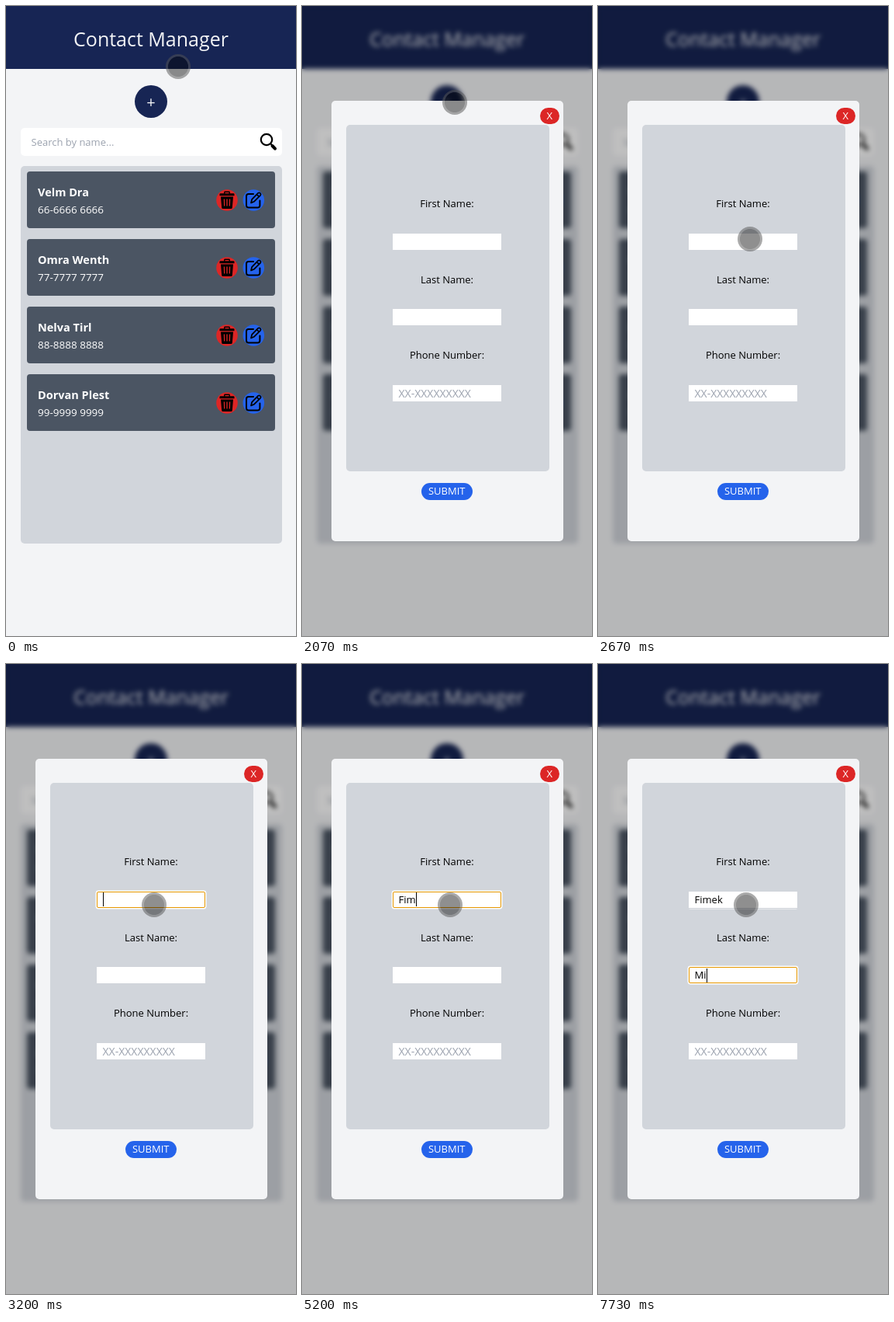
Animation, 374 px wide and 811 px high, one loop 8 s. Source, as an HTML page:

```html
<!DOCTYPE html>
<html lang="en">
<head>
<meta charset="utf-8">
<title>Contact Manager</title>
<style>
  html, body { margin: 0; width: 100%; height: 100%; overflow: hidden; }
  body { position: relative; background: #f3f4f6; font: 13px "Open Sans", "Noto Sans", sans-serif; color: #000; }
  div, svg, i { position: absolute; box-sizing: border-box; }
  .text { white-space: pre; line-height: 20px; height: 20px; }
  .center { left: 0; width: 374px; text-align: center; }
  .hint { color: #9ca3af; }

  #header { left: 0; top: 0; width: 374px; height: 80.5px; background: #172554; }
  #title { top: 32px; font-size: 25px; color: #f3f4f6; }
  #add { left: 166px; top: 102px; width: 42px; height: 42px; border-radius: 50%; background: #172554;
    color: #f3f4f6; font-size: 20px; line-height: 43px; text-align: center; }
  #search { left: 19px; top: 157px; width: 337px; height: 35.5px; border-radius: 5px; background: #fff; }
  #list { left: 19px; top: 206px; width: 337px; height: 486px; border-radius: 5px; background: #d1d5db; }
  .card { left: 8px; width: 320px; height: 73px; border-radius: 4px; background: #4b5563; color: #fff; }
  .card .name { left: 14px; top: 17px; font-size: 14.5px; font-weight: 700; }
  .card .phone { left: 14px; top: 39px; font-size: 13.5px; }
  .card svg { left: 243px; top: 22px; }

  #shade { inset: 0; background: rgba(0, 0, 0, .25); backdrop-filter: blur(3px); }
  #dialog { left: 37.5px; top: 122px; width: 299px; height: 567px; border-radius: 5px; background: #f3f4f6; }
  #panel { left: 56.5px; top: 153px; width: 262px; height: 446px; border-radius: 5px; background: #d1d5db; }
  .pill { color: #fff; text-align: center; border-radius: 11px; }
  #close { left: 307px; top: 130.5px; width: 24.5px; height: 21px; line-height: 21px; background: #dc2626; }
  #submit { left: 153.5px; top: 614px; width: 66.5px; height: 21.5px; line-height: 21.5px; background: #2563eb; }
  .field { left: 117px; width: 140px; height: 21px; background: #fff; padding-left: 7.5px; line-height: 21px; white-space: pre; }
  .field.focus { border-radius: 2px; outline: 1.5px solid #e59700; outline-offset: -1px; box-shadow: 0 0 0 1.4px #fff; }
  .field i { top: 1.5px; width: 1px; height: 18px; background: #000; }
  .field .hint { font-size: 14px; }

  #pointer { left: -16px; top: -16px; width: 32px; height: 32px; border-radius: 50%; background: rgba(85, 85, 85, .5); 
    -webkit-mask: none; }
  #pointer { background: radial-gradient(circle, rgba(0, 0, 0, .44) 12.6px, rgba(85, 85, 85, .5) 13.4px); }
</style>
</head>
<body>
<div id="header"></div>
<div id="title" class="text center">Contact Manager</div>
<div id="add">+</div>
<div id="search">
  <div class="text hint" style="left:13.5px;top:8px">Search by name...</div>
  <svg style="left:308px;top:6px" width="24" height="25" fill="none" stroke="#000" stroke-linecap="round">
    <circle cx="9" cy="9" r="7.2" stroke-width="2.2"/>
    <path d="M14.5 14.5L16 16" stroke-width="2"/>
    <path d="M16.5 17L20 20.6" stroke-width="4"/>
  </svg>
</div>
<div id="list"></div>

<div id="modal">
  <div id="shade" style="width:374px;height:811px"></div>
  <div id="dialog"></div>
  <div id="panel"></div>
  <div id="close" class="pill">X</div>
  <div class="text center" style="top:244px">First Name:</div>
  <div class="field" style="top:292.5px"></div>
  <div class="text center" style="top:342px">Last Name:</div>
  <div class="field" style="top:390px"></div>
  <div class="text center" style="top:439px">Phone Number:</div>
  <div class="field" style="top:487.5px"><span class="hint">XX-XXXXXXXXX</span></div>
  <div id="submit" class="pill">SUBMIT</div>
</div>
<div id="pointer"></div>

<script>
const LOOP = 8000;
const MODAL_AT = 2070;
const $ = id => document.getElementById(id);

const contacts = [
  ["Velm Dra", "66-6666 6666"],
  ["Omra Wenth", "77-7777 7777"],
  ["Nelva Tirl", "88-8888 8888"],
  ["Dorvan Plest", "99-9999 9999"],
];

const icons = `<svg width="66" height="30">
  <circle cx="15" cy="15" r="13.8" fill="#dc2626"/>
  <path d="M5.5 7.2q0-1 1-1h4.6v-1.4q0-1.3 1.3-1.3h5.2q1.3 0 1.3 1.3v1.4h4.6q1 0 1 1v2.1h-19zM12.5 6.2h5v-1.2h-5z" fill-rule="evenodd"/>
  <path d="M7 10.5h16l-1.2 14q-.1 1.5-1.6 1.5h-10.4q-1.5 0-1.6-1.5z"/>
  <path d="M11.4 13.5l.3 9M15 13.5v9M18.6 13.5l-.3 9" stroke="#dc2626" stroke-width="1.3"/>
  <circle cx="49.3" cy="15" r="13.8" fill="#2563eb"/>
  <g fill="none" stroke="#000" stroke-width="2" stroke-linejoin="round" stroke-linecap="round">
    <path d="M49 7h-6.3q-2.7 0-2.7 2.7v12q0 2.7 2.7 2.7h12q2.7 0 2.7-2.7v-6.2"/>
    <path d="M46 18.4l1.2-4.6 8.1-8.1q1.3-1 2.6.3t.3 2.6l-8.1 8.1zM53.5 7.6l2.8 2.8" stroke-width="1.7"/>
  </g>
</svg>`;

$("list").innerHTML = contacts.map(([name, phone], i) =>
  `<div class="card" style="top:${7 + 87 * i}px">
    <div class="text name">${name}</div><div class="text phone">${phone}</div>${icons}
  </div>`).join("");

// time, x, y: the pointer jumps from place to place
const path = [
  [0, 222, 78], [70, 221, 80], [130, 218, 87], [200, 213, 97], [270, 207, 107],
  [330, 202, 116], [400, 198, 122], [470, 197, 124],
  [2200, 197, 130], [2270, 197, 148], [2330, 197, 175], [2400, 197, 208],
  [2470, 197, 240], [2530, 196, 268], [2600, 196, 287], [2670, 196, 300],
  [2730, 196, 309], [2870, 196, 310], [3130, 193, 310], [3200, 191, 310],
];

// time, focused field, first name, last name, caret shown
const typing = [
  [0, -1, "", "", 0],
  [3130, 0, "", "", 1], [3600, 0, "", "", 0], [4070, 0, "", "", 1], [4600, 0, "", "", 0],
  [4670, 0, "F", "", 1], [4930, 0, "Fi", "", 1], [5200, 0, "Fim", "", 1],
  [5330, 0, "Fime", "", 1], [5600, 0, "Fimek", "", 1], [6070, 0, "Fimek", "", 0],
  [6400, 1, "Fimek", "", 1], [6870, 1, "Fimek", "", 0],
  [7270, 1, "Fimek", "M", 1], [7730, 1, "Fimek", "Mi", 1],
];

const fields = [...document.querySelectorAll(".field")].slice(0, 2);
const stepAt = (steps, t) => steps.filter(s => s[0] <= t).pop();
let shown;

function render(t) {
  $("modal").style.display = t < MODAL_AT ? "none" : "block";
  const [, x, y] = stepAt(path, t);
  $("pointer").style.transform = `translate(${x}px, ${y}px)`;

  const state = stepAt(typing, t);
  if (state === shown) return;
  shown = state;
  const [, focus, first, last, caret] = state;
  fields.forEach((field, i) => {
    field.classList.toggle("focus", i === focus);
    field.innerHTML = [first, last][i] + (caret && i === focus ? "<i></i>" : "");
  });
}

const start = performance.now();
function tick() {
  render((performance.now() - start) % LOOP);
  requestAnimationFrame(tick);
}
tick();
</script>
</body>
</html>
```
